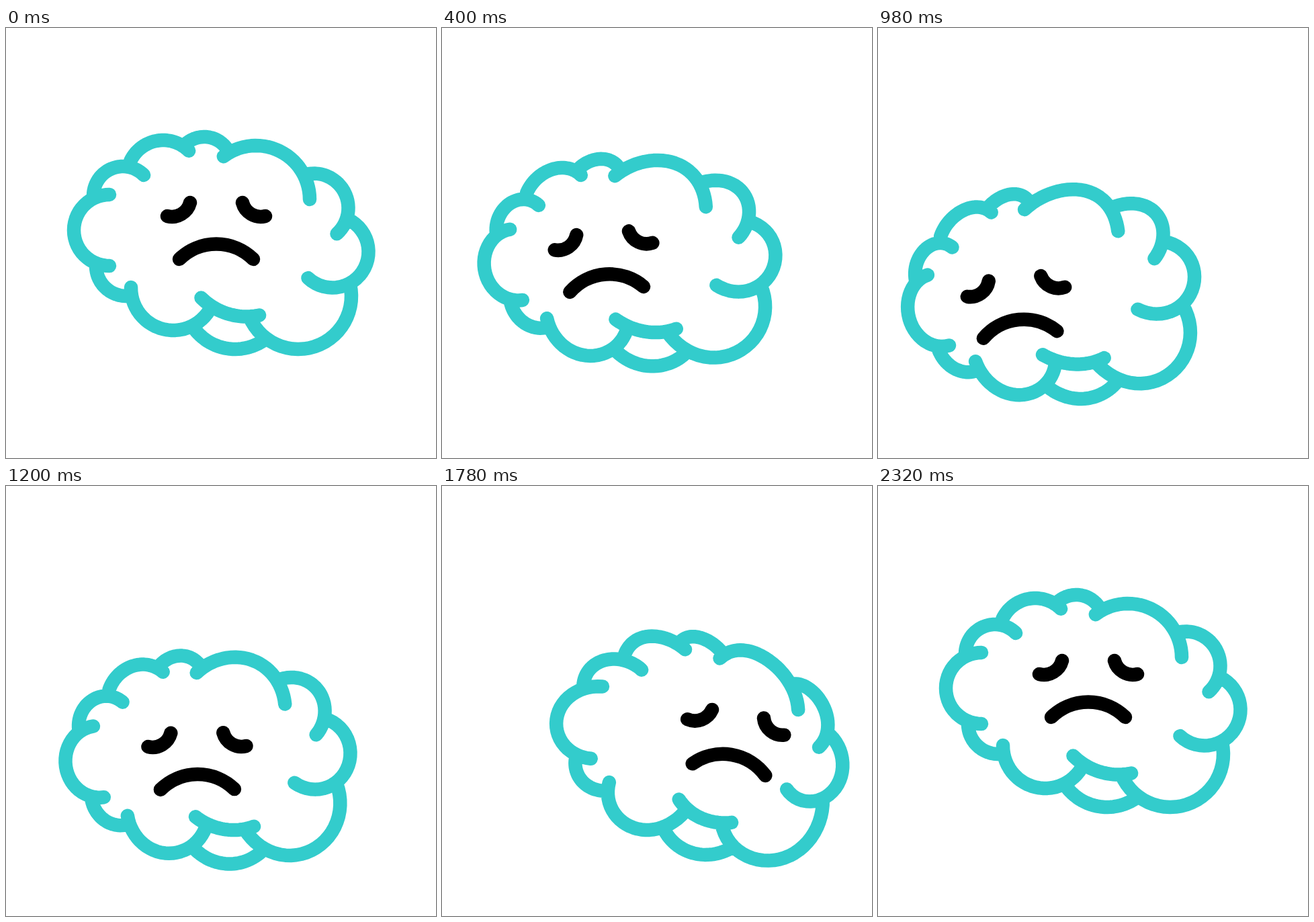
Animation of 640 by 640 pixels, one loop 2.4 s. Source, as an HTML page:

```html
<!DOCTYPE html>
<html lang="en">
<head>
<meta charset="utf-8">
<title>Sad cloud</title>
<style>
  html, body { margin: 0; width: 100%; height: 100%; overflow: hidden; background: #fff; }
  svg { display: block; width: 100%; height: 100%; }
  path { fill: none; stroke-width: 20.5; stroke-linecap: round; stroke-linejoin: round; }
  #cloud { stroke: #33cccc; }
  #face { stroke: #000; }
</style>
</head>
<body>
<svg viewBox="0 0 640 640">
  <path id="cloud"/>
  <path id="face" d="M240 280A28 28 0 0 0 274 260M352 260A28 28 0 0 0 386 280M258 344A78.5 78.5 0 0 1 368 344"/>
</svg>
<script>
const LOOP = 2400, END = 2320, STEPS = 28;

// Outline lobes: centre x, centre y, radius, start and end angle
const lobes = [
  [154, 301, 53, 90, 270],
  [174, 250, 44, 180, 315],
  [234, 221, 54, 206, 315],
  [295, 203, 41, 222, 332],
  [372, 255, 80, 233, 360],
  [458, 268, 51.5, 255, 408],
  [486, 333, 53.5, 295, 493],
  [435, 399, 79, -13, 157],
  [341, 402, 76, 53, 146],
  [249, 387, 63, 26, 181],
  [179, 354, 45, 80, 184],
  [358, 334, 95.5, 78.5, 135]
];

// Where the face looks: ms, x, y
const keys = [
  [0, 0, 0], [400, -73, 45], [800, -143.5, 109], [1200, -29, 107.5],
  [1520, 117, 106], [1680, 138, 93], [2000, 64.5, 42], [END, 0, 0]
];

function slope(i, k) {
  if (i === 0 || i === keys.length - 1) return 0;
  const [a, b, c] = [keys[i - 1], keys[i], keys[i + 1]];
  const h = b[0] - a[0], g = c[0] - b[0];
  return ((b[k] - a[k]) / h * g + (c[k] - b[k]) / g * h) / (h + g);
}

// Smooth curve through the keys
function look(t, k) {
  let i = 0;
  while (i < keys.length - 2 && t > keys[i + 1][0]) i++;
  const a = keys[i], b = keys[i + 1], h = b[0] - a[0], u = (t - a[0]) / h;
  return a[k] + (b[k] - a[k]) * u * u * (3 - 2 * u)
    + h * u * (1 - u) * ((1 - u) * slope(i, k) - u * slope(i + 1, k));
}

// The cloud follows the face, tilts, and shifts most where it bulges
function bend(px, py, x, y) {
  const dx = px - 320, dy = py - 320, X = dx / 230, Y = dy / 168;
  const dome = 1 - X * X - Y * Y + 0.4 * X * Y;
  const follow = 0.5 + 0.02 * X + 0.2 * dome * (1 - Y);
  const tilt = 0.0013 * x - 0.0009 * y;
  return [
    px + x * follow - y * (0.04 + 0.0004 * dx) - tilt * dy,
    py + x * (0.08 + 0.0001 * dy) + 0.836 * y - 0.0006 * x * x + tilt * dx
  ].map(v => v.toFixed(2)).join(' ');
}

function lobePath([cx, cy, r, from, to], x, y) {
  const points = Array.from({ length: STEPS + 1 }, (_, i) => {
    const a = (from + (to - from) * i / STEPS) * Math.PI / 180;
    return bend(cx + r * Math.cos(a), cy + r * Math.sin(a), x, y);
  });
  return 'M' + points.join('L');
}

const cloud = document.getElementById('cloud');
const face = document.getElementById('face');

function draw(t) {
  const x = look(t, 1), y = look(t, 2);
  cloud.setAttribute('d', lobes.map(l => lobePath(l, x, y)).join(''));
  const turn = 0.065 * x + 0.0135 * y;
  face.setAttribute('transform', `translate(${x} ${y}) rotate(${turn} 313 270)`);
}

const start = performance.now();
function tick() {
  draw(Math.min((performance.now() - start) % LOOP, END));
  requestAnimationFrame(tick);
}
tick();
</script>
</body>
</html>
```
